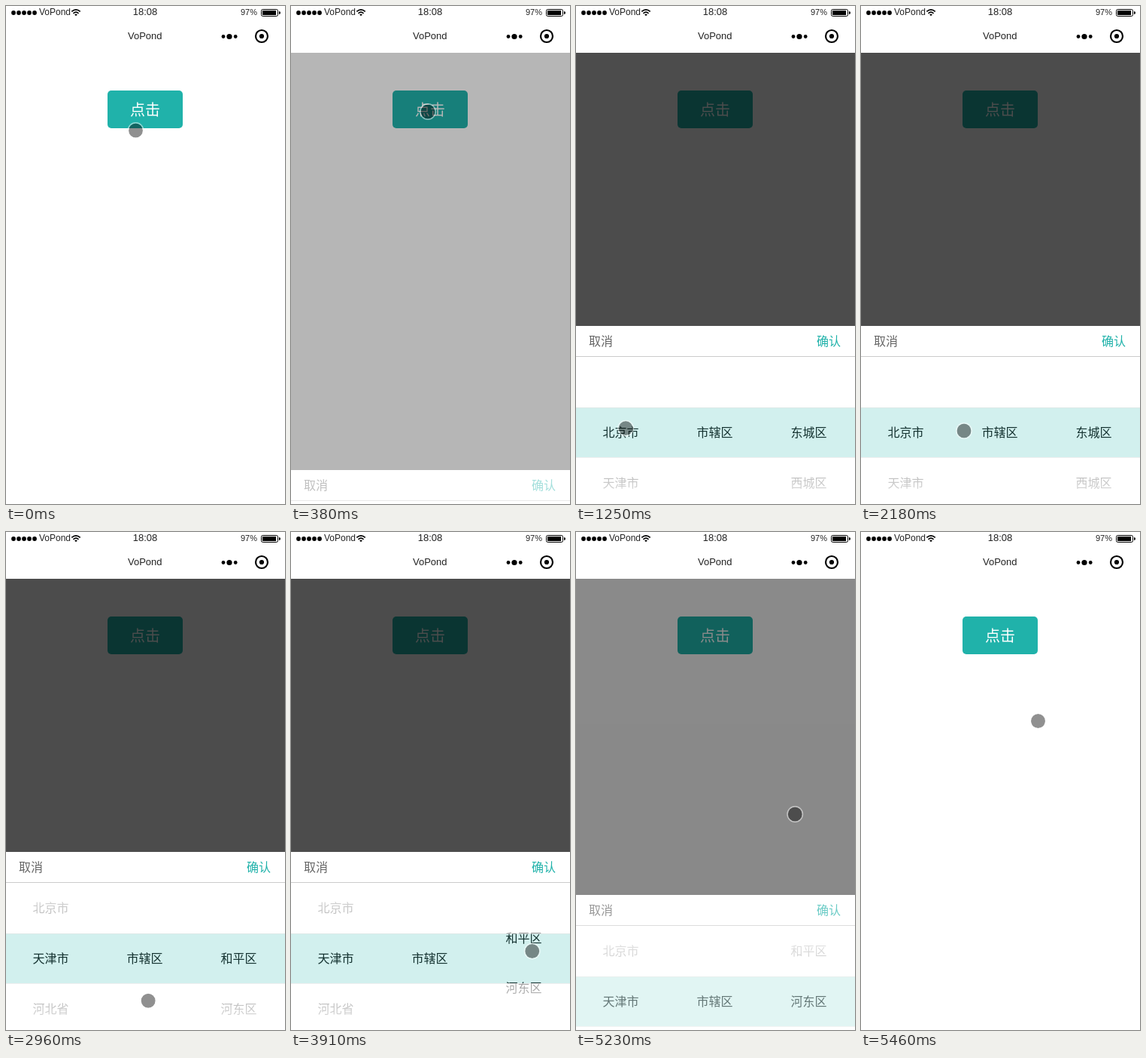
Write an HTML page that moves like this. It is 371 px wide and 660 px high and loops after 5.7 s.

```html
<!DOCTYPE html>
<html lang="zh-CN">
<head>
<meta charset="utf-8">
<title>Region picker</title>
<style>
  html, body { margin: 0; width: 100%; height: 100%; overflow: hidden; background: #fff; }
  svg { display: block; width: 371px; height: 660px; }
  text { font-family: "Noto Sans CJK SC", "Noto Sans CJK", "Noto Sans CJK JP", sans-serif; font-size: 16px; }
  .bar text { font-family: "Liberation Sans", Arial, sans-serif; fill: #222; }
  .mid text { text-anchor: middle; fill: #111; }
</style>
</head>
<body>
<svg viewBox="0 0 371 660">
  <defs>
    <linearGradient id="fadeTop" x1="0" y1="0" x2="0" y2="1">
      <stop offset="0" stop-color="#fff" stop-opacity=".95"/>
      <stop offset="1" stop-color="#fff" stop-opacity=".6"/>
    </linearGradient>
    <linearGradient id="fadeBottom" x1="0" y1="1" x2="0" y2="0">
      <stop offset="0" stop-color="#fff" stop-opacity=".95"/>
      <stop offset="1" stop-color="#fff" stop-opacity=".6"/>
    </linearGradient>
  </defs>

  <rect x="135" y="112" width="100" height="50" rx="5" fill="#20b2aa"/>
  <text x="185" y="144.6" text-anchor="middle" fill="#fff" style="font-size:20px">点击</text>

  <g id="modal">
    <rect y="62" width="371" height="598" fill="#000" fill-opacity=".7"/>
    <g id="panel">
      <rect y="424" width="371" height="244" fill="#fff"/>
      <g id="columns" class="mid"></g>
      <rect y="464" width="371" height="68" fill="url(#fadeTop)"/>
      <rect y="598" width="371" height="68" fill="url(#fadeBottom)"/>
      <rect y="532" width="371" height="66" fill="#20b2aa" fill-opacity=".2"/>
      <path d="M0 532.5H371M0 598.5H371" stroke="#e5e5e5" stroke-opacity=".6"/>
      <rect y="424" width="371" height="40" fill="#fff"/>
      <path d="M0 464.5H371" stroke="#ccc"/>
      <text x="17" y="450" fill="#666">取消</text>
      <text x="320" y="450" fill="#20b2aa">确认</text>
    </g>
  </g>

  <g class="bar">
    <g id="signal"></g>
    <text x="44" y="12" style="font-size:12px">VoPond</text>
    <g fill="none" stroke="#000" stroke-width="1.7">
      <path d="M87.3 7.4Q93 2.4 98.7 7.4"/>
      <path d="M89.5 9.8Q93 6.6 96.5 9.8"/>
    </g>
    <path d="M91.2 11.3Q93 9.8 94.8 11.3L93 13.2Z"/>
    <text x="185" y="12" text-anchor="middle" style="font-size:13px">18:08</text>
    <text x="312" y="12" style="font-size:11px">97%</text>
    <rect x="339.5" y="4.5" width="22" height="9" rx="2" fill="none" stroke="#000"/>
    <rect x="341" y="6" width="18" height="6"/>
    <path d="M363 7Q365 7 365 9T363 11Z"/>
    <text x="184.8" y="44.4" text-anchor="middle" style="font-size:13px">VoPond</text>
    <circle cx="289" cy="40.5" r="2.4"/>
    <circle cx="297" cy="40.5" r="3.6"/>
    <circle cx="305.2" cy="40.5" r="2.4"/>
    <circle cx="340" cy="40" r="8" fill="none" stroke="#000" stroke-width="2.2"/>
    <circle cx="340" cy="40" r="3.1"/>
  </g>

  <g id="touch">
    <circle r="9.5" fill="#000" fill-opacity=".435"/>
    <circle r="10.2" fill="none" stroke="#fff" stroke-opacity=".5" stroke-width="1.5"/>
  </g>
  <path id="arrow" d="M.5 .5L12.5 14L9.8 16L10.8 21L7.5 23.5L4.5 20L.5 21.5Z"
        fill="#fff" fill-opacity=".75" stroke="#333"/>
</svg>

<script>
const LOOP = 5700, ROW = 66.8, CENTER = 565, SLIDE = 236;
const $ = id => document.getElementById(id);
const progress = (t, start, length) => Math.max(0, Math.min(1, (t - start) / length));
const easeIn = u => u * u;
const easeOut = u => 1 - (1 - u) ** 2;
const linear = u => u;

function make(tag, attrs, parent, label = '') {
  const el = document.createElementNS('http://www.w3.org/2000/svg', tag);
  for (const k in attrs) el.setAttribute(k, attrs[k]);
  el.textContent = label;
  parent.append(el);
  return el;
}

for (let i = 0; i < 5; i++) make('circle', { cx: 10 + 7 * i, cy: 9, r: 2.9 }, $('signal'));

function column(x, names) {
  const g = make('g', {}, $('columns'));
  names.forEach((name, i) => make('text', { x, y: CENTER + 6 + ROW * i }, g, name));
  return g;
}
const provinces = column(59.5, ['北京市', '天津市', '河北省', '山西省']);
column(184.5, ['市辖区']);
const beijing = column(309.5, ['东城区', '西城区', '朝阳区']);
const tianjin = column(309.5, ['和平区', '河东区', '河西区', '南开区']);

// The pointer glides to each stop in turn and rests there; a bend bows the path.
const stop = (from, to, x, y, { ease = linear, bendX = 0, bendY = 0 } = {}) =>
  ({ from, to, x, y, ease, bendX, bendY });
const home = { x: 172.5, y: 165 };
const stops = [
  stop(50, 230, 182, 140),
  stop(380, 930, 148, 470, { ease: easeIn, bendX: 20 }),
  stop(1000, 1250, 65.5, 559.5),
  stop(1250, 1570, 265, 592),
  stop(1620, 2060, 114, 573),
  stop(2060, 2180, 137, 563),
  stop(2230, 2400, 66, 600),
  stop(2400, 2600, 72, 548),
  stop(2700, 3130, 265, 598, { bendY: 45 }),
  stop(3270, 3360, 319, 588),
  stop(3470, 3680, 319, 588, { bendX: 41 }),
  stop(3770, 4380, 326.5, 447.5),
  stop(5060, 5080, 328, 455.5),
  stop(5080, 5460, 235.5, 250.5)
];

function pointerAt(t) {
  let { x, y } = home;
  for (const s of stops) {
    if (t < s.from) break;
    const u = s.ease(progress(t, s.from, s.to - s.from)), bow = 4 * u * (1 - u);
    x += (s.x - x) * u + s.bendX * bow;
    y += (s.y - y) * u + s.bendY * bow;
  }
  return [x, y];
}

const move = (el, x, y) => el.setAttribute('transform', `translate(${x} ${y})`);
const show = (el, on) => el.setAttribute('display', on ? 'inline' : 'none');
const scroll = (el, t, start, length) =>
  move(el, 0, -ROW * easeOut(progress(t, start, length)));

function draw(t) {
  const opening = t < 5080;
  const hidden = opening ? 1 - progress(t, 340, 410) : progress(t, 5035, 400);
  show($('modal'), t >= 380 && t < 5460);
  $('modal').setAttribute('opacity', 1 - hidden ** (opening ? 5 : 1.5));
  move($('panel'), 0, Math.round(SLIDE * hidden ** 2));

  scroll(provinces, t, 2400, 560);
  scroll(tianjin, t, 3800, 480);
  show(beijing, t < 2740);
  show(tianjin, t >= 2740);

  const [x, y] = pointerAt(t);
  const hovering = t >= 4450 && t < 5130;
  show($('arrow'), hovering);
  show($('touch'), !hovering);
  move($('arrow'), x + 1.5, y - 11.5);
  move($('touch'), x, y);
}

function tick() {
  draw(performance.now() % LOOP);
  requestAnimationFrame(tick);
}
tick();
</script>
</body>
</html>
```
